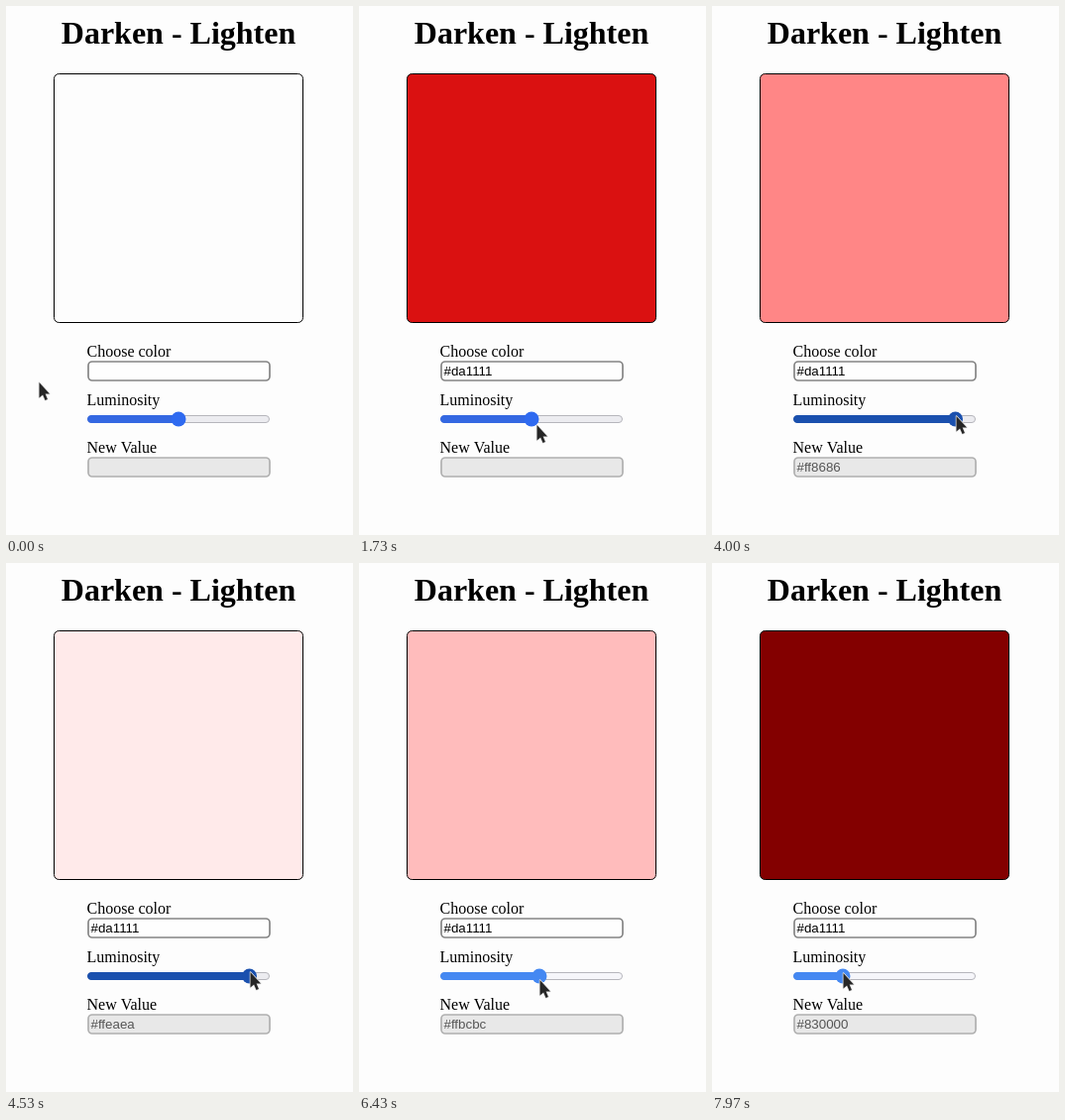
An HTML page with a canvas for the animation above (8000 ms loop, 350 px wide and 534 px high).

```html
<!DOCTYPE html>
<html lang="en">
<head>
<meta charset="utf-8">
<title>Darken - Lighten</title>
<style>
html, body { margin: 0; width: 100%; height: 100%; overflow: hidden; background: #fdfdfd; }
canvas { display: block; width: 350px; height: 534px; }
</style>
</head>
<body>
<canvas id="stage"></canvas>
<script>
const LOOP = 8000, W = 350, H = 534;
const PAGE = '#fdfdfd';
const MID = 174, HALF = 84, TRACK_Y = 417, LEFT = 81.5;
const PASTE = 700, FILL = 850, GRAB = 2300, LAG = 700;
const SERIF = '"Liberation Serif", "Times New Roman", serif';
const SANS = '"Liberation Sans", Arial, sans-serif';

const canvas = document.getElementById('stage');
const ctx = canvas.getContext('2d');
const dpr = window.devicePixelRatio || 1;
canvas.width = W * dpr;
canvas.height = H * dpr;

const clamp = (v, low, high) => Math.max(low, Math.min(high, v));
const ramp = (t, from, to) => clamp((t - from) / (to - from), 0, 1);
const ease = (t, from, to) => (1 - Math.cos(Math.PI * ramp(t, from, to))) / 2;

// The first drag hesitates halfway, the later ones are steady.
function thumbX(t) {
  const u = ramp(t, GRAB, 3830);
  return MID + 71.5 * u + 10 * Math.sin(2 * Math.PI * u)
    + 12.5 * ramp(t, 4700, 5000)
    - 112.7 * ramp(t, 5329, 6962)
    - 13.3 * ramp(t, 7730, 7970);
}

function cursorAt(t) {
  if (t >= GRAB) {
    return [thumbX(t), TRACK_Y + 4 * Math.cos(Math.PI * (t - 6430) / 1900)];
  }
  const toField = ease(t, 30, 600), leave = ease(t, 860, 1070);
  const back = ease(t, 1220, 1730), settle = ease(t, 1800, GRAB);
  return [
    33 + 120 * toField + 184 * leave - 158 * back - 5 * settle,
    380 - 12 * toField + 44 * leave + 11 * back - 4 * settle
  ];
}

// The new colour trails the slider.
function newColor(t) {
  const amount = (thumbX(t - LAG) - MID) / HALF * 255;
  const channel = base =>
    clamp(Math.round(base + amount), 0, 255).toString(16).padStart(2, '0');
  return '#' + channel(0xda) + channel(0x11) + channel(0x11);
}

function box(x, y, w, h, r, fill, line, width = 1) {
  ctx.beginPath();
  ctx.roundRect(x, y, w, h, r);
  ctx.fillStyle = fill;
  ctx.fill();
  ctx.strokeStyle = line;
  ctx.lineWidth = width;
  ctx.stroke();
}

function text(str, x, y, font, color = '#000', align = 'left') {
  ctx.font = font;
  ctx.fillStyle = color;
  ctx.textAlign = align;
  ctx.fillText(str, x, y);
}

function field(name, y, value, fill, line, color) {
  text(name, LEFT, y - 4, '16px ' + SERIF);
  box(83, y + 1, 183, 19, 4, fill, line, 1.7);
  text(value, LEFT + 4, y + 15, '13.333px ' + SANS, color);
}

function slider(t) {
  const x = thumbX(t);
  const idle = t < GRAB, released = t > 4000 && t < 4700;
  const fill = idle ? '#3468e2' : released ? '#1a50ae' : '#4488f2';
  const rest = idle || released ? '#ececf0' : '#f6f6fa';
  text('Luminosity', LEFT, 403, '16px ' + SERIF);
  box(82.5, TRACK_Y - 3.5, 183, 7, 3.5, rest, '#b6b6bc');
  ctx.save();
  ctx.beginPath();
  ctx.rect(82, TRACK_Y - 5, x - 82, 10);
  ctx.clip();
  box(82.5, TRACK_Y - 3.5, 183, 7, 3.5, fill, fill);
  ctx.restore();
  ctx.beginPath();
  ctx.arc(x, TRACK_Y, 7.5, 0, Math.PI * 2);
  ctx.fillStyle = idle ? '#2f6af0' : fill;
  ctx.fill();
}

function cursor(x, y) {
  const arrow = new Path2D('M0 0V15.5L3.6 12.4 6 18 8.4 16.9 6.1 11.4H10.5Z');
  ctx.save();
  ctx.translate(Math.round(x) + 0.5, Math.round(y));
  ctx.lineJoin = 'round';
  ctx.lineWidth = 1.5;
  ctx.strokeStyle = '#e4e4e4';
  ctx.stroke(arrow);
  ctx.fillStyle = '#262626';
  ctx.fill(arrow);
  ctx.restore();
}

function draw(t) {
  ctx.setTransform(dpr, 0, 0, dpr, 0, 0);
  ctx.fillStyle = PAGE;
  ctx.fillRect(0, 0, W, H);

  const color = newColor(t);
  text('Darken - Lighten', MID, 38, 'bold 32px ' + SERIF, '#000', 'center');
  box(48.5, 68.5, 251, 251, 5, t < FILL ? PAGE : color, '#000');
  field('Choose color', 358, t < PASTE ? '' : '#da1111', '#fefefe', '#858585', '#000');
  slider(t);
  field('New Value', 455, t < GRAB + LAG ? '' : color, '#e8e8e8', '#b0b0b0', '#555');
  cursor(...cursorAt(t));
}

const start = performance.now();
function tick() {
  draw((performance.now() - start) % LOOP);
  requestAnimationFrame(tick);
}
tick();
</script>
</body>
</html>
```
